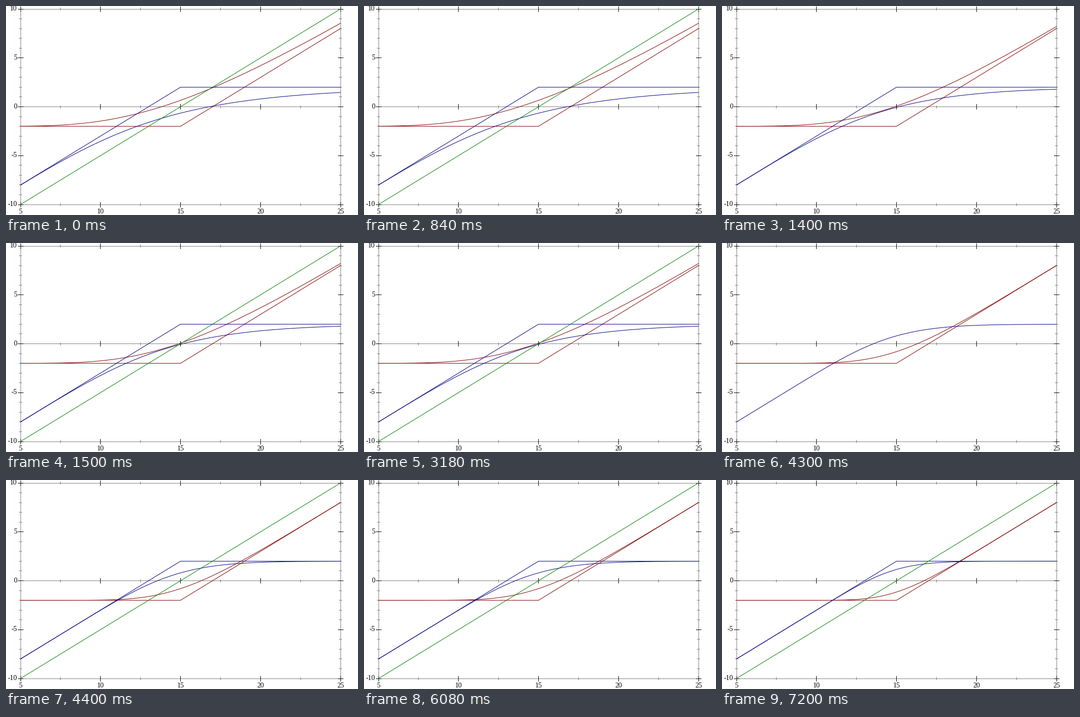
Write a matplotlib script that moves like this. It is 703 by 418 pixels and loops after 8000 ms.

```python
import math

import matplotlib.pyplot as plt
import numpy as np
from matplotlib.animation import FuncAnimation

W, H, DPI = 703, 418, 64
PX = 72 / DPI
LEFT, RIGHT, TOP, BOTTOM = 29, 668, 6, 397
STRIKE, PREMIUM, VOLATILITY = 15, 2, 0.2
RED, BLUE, GREEN = "#800000", "#000080", "#008000"
GREY = "#7f7f7f"
INTERVAL, FRAMES = 100, 80

# start in ms, years to expiry, number of lines already drawn
STAGES = [(0, 5, 5), (1400, 3, 4), (1500, 3, 5),
          (4300, 1, 3), (4400, 1, 5), (7200, 0.5, 5)]

fig = plt.figure(figsize=(W / DPI, H / DPI), dpi=DPI, facecolor="white")
ax = fig.add_axes([0, 0, 1, 1])
ax.set(xlim=(0, W), ylim=(H, 0))
ax.axis("off")


def to_x(price):
    return LEFT + (price - 5) * (RIGHT - LEFT) / 20


def to_y(profit):
    return BOTTOM - (profit + 10) * (BOTTOM - TOP) / 20


def rule(x0, y0, x1, y1, color):
    """Draw a straight line through the centres of whole pixels."""
    xs, ys = np.floor([x0, x1]) + 0.5, np.floor([y0, y1]) + 0.5
    ax.plot(xs, ys, color=color, lw=PX, snap=False,
            solid_capstyle="projecting", zorder=1)


def tick(x, y, vertical, major):
    r = 5 if major else 2.5
    dx, dy = (0, r) if vertical else (r, 0)
    rule(x - dx, y - dy, x + dx, y + dy, "black" if major else GREY)


def label(x, y, text, align):
    ax.text(x, y, text, family="Liberation Serif", size=14 * PX,
            ha=align, va="baseline")


def draw_axes():
    zero = to_y(0)
    for y in (TOP, zero, BOTTOM):
        rule(LEFT, y, RIGHT, y, GREY)
    for x in (LEFT, RIGHT):
        rule(x, TOP, x, BOTTOM, GREY)
    for price in np.arange(5, 25.1, 2.5):
        x, major = to_x(price), price % 5 == 0
        for y in (TOP, zero, BOTTOM):
            if y != zero or 5 < price < 25:
                tick(x, y, True, major)
        if major:
            label(x - 0.1, 415, f"{price:.0f}", "center")
    for profit in range(-10, 11):
        y, major = to_y(profit), profit % 5 == 0
        for x in (LEFT, RIGHT):
            tick(x, y, False, major)
        if major:
            label(22, y + 3.1, str(profit), "right")


def normal_cdf(values):
    return np.array([0.5 * (1 + math.erf(v / math.sqrt(2))) for v in values])


def call_value(price, years):
    spread = VOLATILITY * math.sqrt(years)
    d1 = np.log(price / STRIKE) / spread + spread / 2
    return price * normal_cdf(d1) - STRIKE * normal_cdf(d1 - spread)


prices = np.linspace(5, 25, 401)
payoff = np.maximum(prices - STRIKE, 0)
curve_x = to_x(prices)


def curve(profit, color, order):
    return ax.plot(curve_x, to_y(profit), color=color, lw=PX, snap=False,
                   solid_capstyle="projecting", zorder=order)[0]


draw_axes()
call_payoff = curve(payoff - PREMIUM, RED, 2)
call_curve = curve(payoff - PREMIUM, RED, 3)
put_curve = curve(payoff, BLUE, 4)
put_payoff = curve(PREMIUM + prices - STRIKE - payoff, BLUE, 5)
stock = curve(prices - STRIKE, GREEN, 6)
lines = [call_payoff, call_curve, put_curve, put_payoff, stock]


def update(frame):
    now = frame * INTERVAL
    _, years, drawn = [s for s in STAGES if s[0] <= now][-1]
    call = call_value(prices, years)
    call_curve.set_ydata(to_y(call - PREMIUM))
    put_curve.set_ydata(to_y(PREMIUM + prices - STRIKE - call))
    for i, line in enumerate(lines):
        line.set_visible(i < drawn)
    return lines


anim = FuncAnimation(fig, update, frames=FRAMES, interval=INTERVAL,
                     repeat=True, repeat_delay=0)
plt.show()
```
